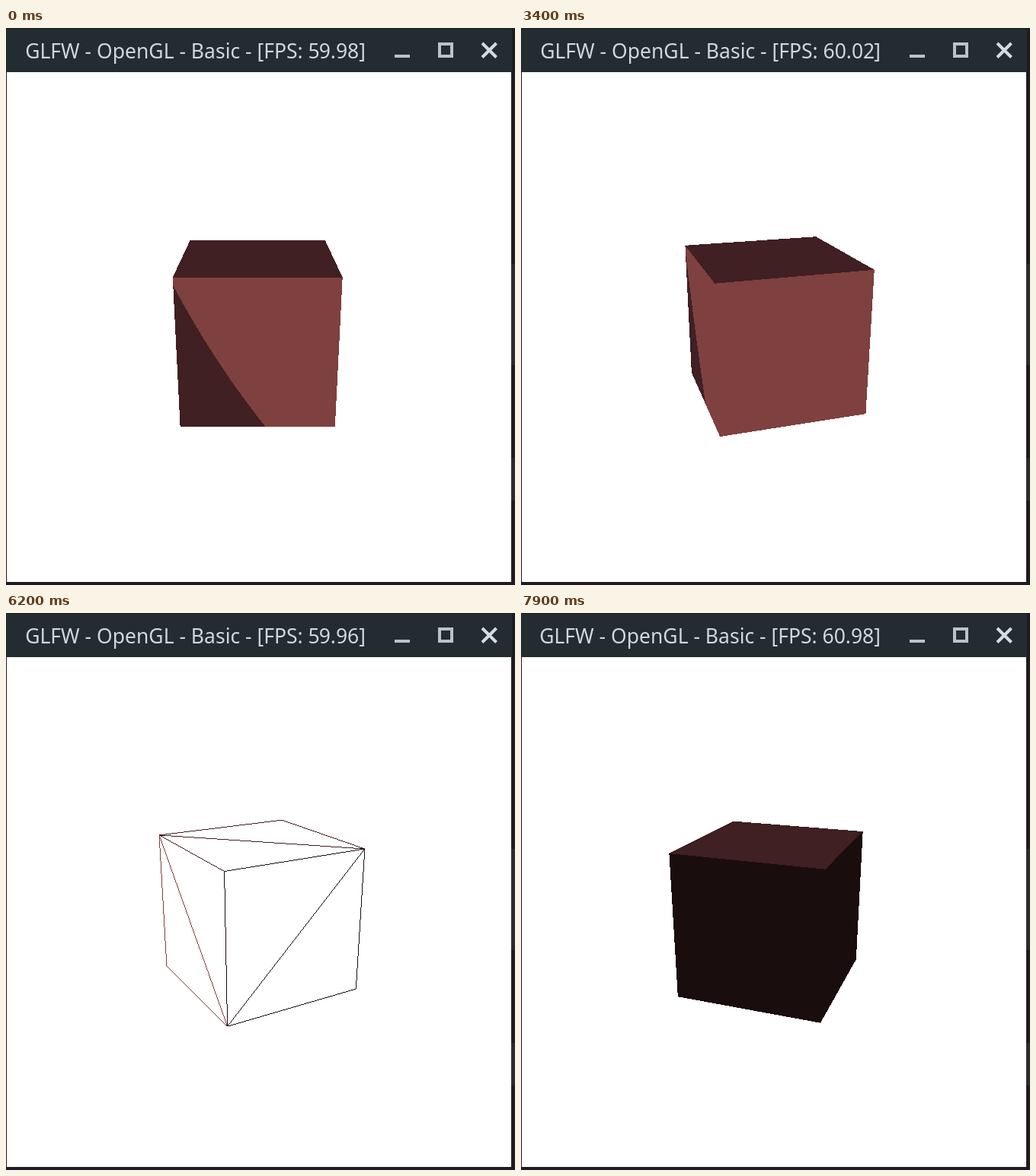
Write an HTML page with a canvas that moves like this. It is 668 by 732 pixels and loops after 8000 ms.

```html
<!DOCTYPE html>
<html lang="en">
<head>
<meta charset="utf-8">
<title>Cube</title>
<style>
  html, body { margin: 0; width: 100%; height: 100%; overflow: hidden; background: #fff; }
  canvas { display: block; width: 668px; height: 732px; }
</style>
</head>
<body>
<canvas id="stage" width="668" height="732"></canvas>
<script>
const ctx = document.getElementById('stage').getContext('2d');
const LOOP = 8000, STEP = 100;
const WIRE_ON = 5400, CULL_OFF = 6700, WIRE_OFF = 7600;
const LIT = '#7f4040', DIM = '#402022', DARK = '#1a0d0e';

// [time, degrees]: the cube's turn about the vertical axis
const TURN = [[700, 0], [800, -0.7], [1500, -20.1], [2500, -49.4], [2600, -49.4],
  [3400, -72.8], [4600, -106.5], [6200, -150.3], [7300, -184.1], [7900, -200]];

const FPS = [[0, '59.98'], [100, '61.02'], [1200, '62.61'], [2200, '59.96'], [3200, '60.02'],
  [4200, '60.01'], [5200, '59.96'], [6300, '60.00'], [7300, '60.98']];

// Corners run around each face; the first and third share the triangle diagonal.
const H = 0.5;
const FACES = [
  { color: DIM, pts: [[H, H, H], [-H, H, H], [-H, -H, H], [H, -H, H]], lit: litArea() },
  { color: LIT, pts: [[H, H, H], [H, -H, H], [H, -H, -H], [H, H, -H]] },
  { color: DIM, pts: [[H, H, H], [H, H, -H], [-H, H, -H], [-H, H, H]] },
  { color: DARK, pts: [[-H, H, -H], [H, H, -H], [H, -H, -H], [-H, -H, -H]] },
  { color: DARK, pts: [[-H, H, H], [-H, H, -H], [-H, -H, -H], [-H, -H, H]] },
  { color: DARK, pts: [[H, -H, H], [-H, -H, H], [-H, -H, -H], [H, -H, -H]] }
];

// Part of the front face where a point light at (5, 3, 4) gives a cosine above 0.5.
function litArea() {
  const light = [5, 3, 4], dz = light[2] - H, r2 = 3 * dz * dz, pts = [];
  for (let i = 0; i <= 40; i++) {
    const y = H - i / 40;
    const x = light[0] - Math.sqrt(r2 - (y - light[1]) ** 2);
    pts.push([Math.max(-H, x), y, H]);
  }
  return pts.concat([[H, -H, H], [H, H, H]]);
}

function angleAt(t) {
  if (t <= TURN[0][0]) return 0;
  const i = TURN.findIndex(k => k[0] >= t);
  const [t0, a0] = TURN[i - 1], [t1, a1] = TURN[i];
  return (a0 + (a1 - a0) * (t - t0) / (t1 - t0)) * Math.PI / 180;
}

// Camera at (0, 1.5, 4) looking at the origin, 45 degree field of view
function projector(angle) {
  const c = Math.cos(angle), s = Math.sin(angle);
  const dist = Math.hypot(1.5, 4), sp = 1.5 / dist, cp = 4 / dist;
  const focal = 335 / Math.tan(Math.PI / 8);
  return ([x, y, z]) => {
    const drop = 1.5 - y, away = 4 - (z * c - x * s);
    const k = focal / (cp * away + sp * drop);
    return [330.2 + (x * c + z * s) * k, 393 - (sp * away - cp * drop) * k];
  };
}

function facesViewer([a, b, c]) {
  return (b[0] - a[0]) * (c[1] - a[1]) - (b[1] - a[1]) * (c[0] - a[0]) < 0;
}

function box(x, y, w, h, color) {
  ctx.fillStyle = color;
  ctx.fillRect(x, y, w, h);
}

// Fills a convex polygon row by row with hard pixel edges.
function fillArea(pts, color) {
  const ys = pts.map(p => p[1]);
  const last = Math.max(...ys) - 0.5;
  for (let row = Math.ceil(Math.min(...ys) - 0.5); row < last; row++) {
    const y = row + 0.5, cuts = [];
    pts.forEach(([x0, y0], i) => {
      const [x1, y1] = pts[(i + 1) % pts.length];
      if ((y0 <= y) !== (y1 <= y)) cuts.push(x0 + (x1 - x0) * (y - y0) / (y1 - y0));
    });
    const left = Math.ceil(Math.min(...cuts) - 0.5);
    const right = Math.ceil(Math.max(...cuts) - 0.5);
    if (right > left) box(left, row, right - left, 1, color);
  }
}

// One pixel per step along the longer axis
function drawLine(a, b, color) {
  const axis = Math.abs(b[0] - a[0]) > Math.abs(b[1] - a[1]) ? 0 : 1;
  const [p, q] = a[axis] < b[axis] ? [a, b] : [b, a];
  const slope = (q[1 - axis] - p[1 - axis]) / (q[axis] - p[axis]);
  for (let i = Math.ceil(p[axis] - 0.5); i + 0.5 < q[axis]; i++) {
    const j = Math.floor(p[1 - axis] + (i + 0.5 - p[axis]) * slope);
    if (axis === 0) box(i, j, 1, 1, color);
    else box(j, i, 1, 1, color);
  }
}

function strokeFace(pts, color) {
  pts.forEach((p, i) => drawLine(p, pts[(i + 1) % pts.length], color));
  drawLine(pts[0], pts[2], color);
}

function clipTo(pts) {
  ctx.beginPath();
  pts.forEach(p => ctx.lineTo(p[0], p[1]));
  ctx.clip();
}

function drawCube(t) {
  const wire = t >= WIRE_ON && t < WIRE_OFF;
  const cull = !wire || t < CULL_OFF;
  const draw = wire ? strokeFace : fillArea;
  const project = projector(angleAt(t));
  for (const face of FACES) {
    const pts = face.pts.map(project);
    if (cull && !facesViewer(pts)) continue;
    draw(pts, face.color);
    if (!face.lit) continue;
    const lit = face.lit.map(project);
    if (wire) {
      ctx.save();
      clipTo(lit);
      strokeFace(pts, LIT);
      ctx.restore();
    } else {
      fillArea(lit, LIT);
    }
  }
}

// Right-aligned title whose digits are proportional
function drawTitle(t) {
  const fps = FPS.filter(k => k[0] <= t).pop()[1];
  const trim = { 1: 4, 2: 1, 5: 1 };
  let x = 472;
  ctx.font = '26.5px "Noto Sans", "Open Sans", sans-serif';
  ctx.textBaseline = 'alphabetic';
  ctx.fillStyle = '#cfd8dc';
  const put = text => {
    x -= ctx.measureText(text).width - (trim[text] || 0);
    ctx.fillText(text, x, 40);
  };
  [...(fps + ']')].reverse().forEach(put);
  put('GLFW - OpenGL - Basic - [FPS: ');
}

function drawWindow(t) {
  box(0, 0, 668, 732, '#1f1b24');
  box(663, 310, 5, 133, '#2c2a33');
  box(663, 565, 5, 56, '#2c2a33');
  box(0, 0, 664, 58, '#232d31');
  box(0, 0, 664, 2, '#1e272b');
  box(1, 58, 662, 670, '#fff');
  drawTitle(t);
  box(510, 35, 20, 4, '#b9c4c9');
  ctx.lineWidth = 4;
  ctx.strokeStyle = '#b9c4c9';
  ctx.strokeRect(569, 21, 16, 16);
  ctx.strokeStyle = '#d5dcdf';
  ctx.beginPath();
  ctx.moveTo(625, 20);
  ctx.lineTo(643.5, 38.5);
  ctx.moveTo(643.5, 20);
  ctx.lineTo(625, 38.5);
  ctx.stroke();
}

const start = performance.now();
function frame() {
  const elapsed = Math.max(0, performance.now() - start) % LOOP;
  const t = Math.floor(elapsed / STEP) * STEP;
  drawWindow(t);
  drawCube(t);
  requestAnimationFrame(frame);
}
frame();
</script>
</body>
</html>
```
